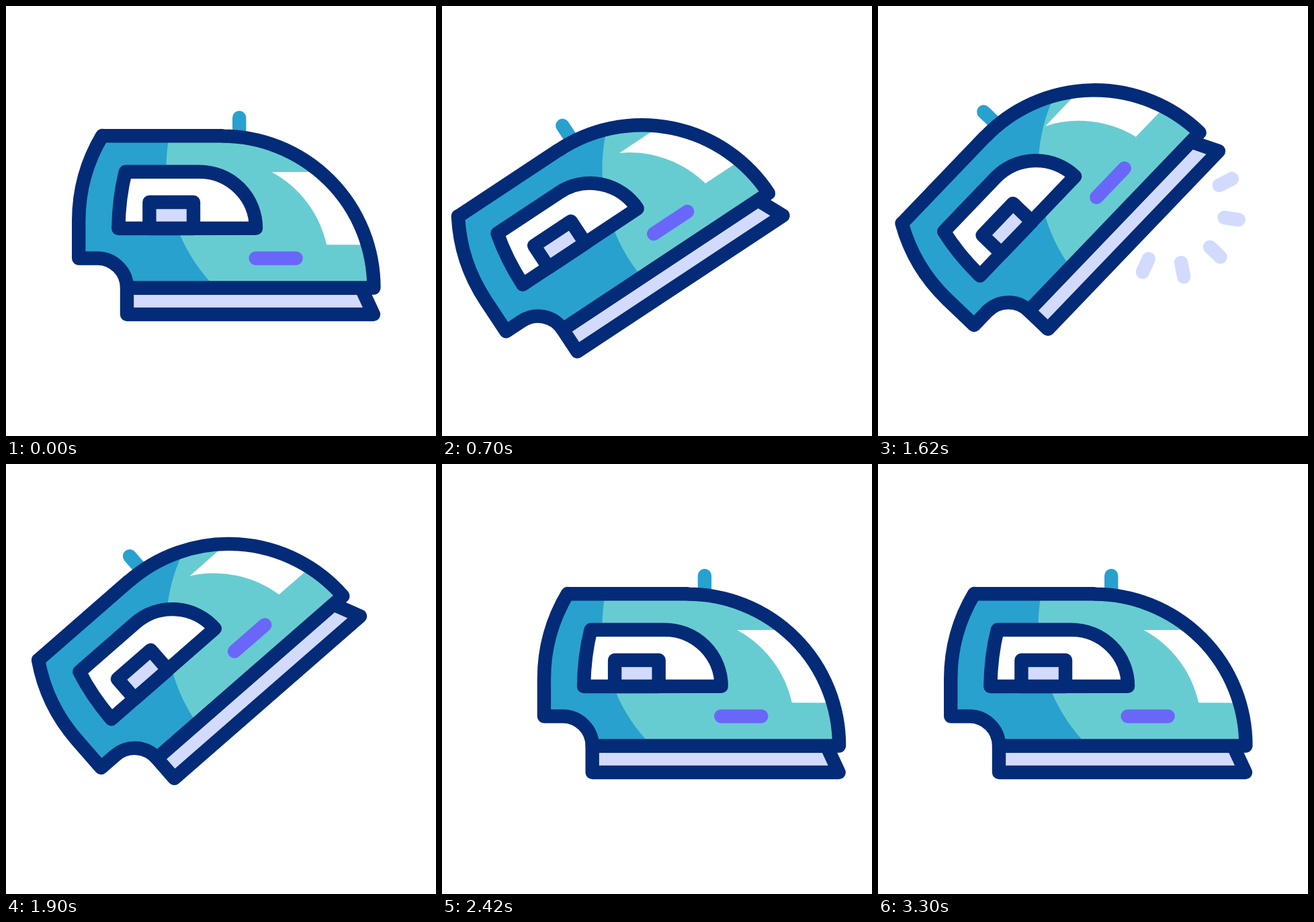
Animation, 640 px wide and 640 px high, one loop 3.4 s. Source, as an HTML page with a canvas:

```html
<!DOCTYPE html>
<html lang="en">
<head>
<meta charset="utf-8">
<title>Steam iron</title>
<style>
  html, body { margin: 0; width: 100%; height: 100%; overflow: hidden; background: #fff; }
  canvas { display: block; width: 640px; height: 640px; }
</style>
</head>
<body>
<canvas id="stage" width="640" height="640"></canvas>
<script>
const ctx = document.getElementById('stage').getContext('2d');
const LOOP = 3400;
const LINE = 20.4;
const NAVY = '#032b77', BLUE = '#28a1ce', TEAL = '#67ccd1', PALE = '#d2dbfd', VIOLET = '#6a66fa';
const PIVOT = { x: 328, y: 312.5 };

// time, angle in degrees, shift x, shift y
const POSES = [
  [100, 0, 0, 0],
  [280, -3.2, -9, 28],
  [460, -12.84, -35.3, 63.8],
  [530, -17.8, -53, 62.5],
  [645, -27.5, -80, 17.6],
  [790, -40.5, -87, -22.4],
  [1080, -42.5, -84, -28.5],
  [1620, -46.2, -78.4, -39.8],
  [1740, -47, -77.2, -42.3],
  [1930, -39.5, -58, -54],
  [2120, -23.3, -4, -61.1],
  [2265, -10.3, 31, -39],
  [2400, 0, 44.2, 0],
  [2950, 0, -75, 0],
  [3300, 0, 0, 0]
];

const clamp = x => Math.min(1, Math.max(0, x));
const span = (t, a, b) => clamp((t - a) / (b - a));
const smooth = x => x * x * (3 - 2 * x);
const easeOut = x => 1 - (1 - x) * (1 - x);

function slope(i, k) {
  const a = POSES[i], b = POSES[i + 1];
  return (b[k] - a[k]) / (b[0] - a[0]);
}

// Harmonic mean keeps the curve free of overshoot
function tangent(i, k) {
  if (i === 0 || i === POSES.length - 1) return 0;
  const a = slope(i - 1, k), b = slope(i, k);
  return a * b <= 0 ? 0 : 2 * a * b / (a + b);
}

function channel(t, k) {
  const last = POSES.length - 1;
  if (t <= POSES[0][0]) return POSES[0][k];
  if (t >= POSES[last][0]) return POSES[last][k];
  let i = 0;
  while (t >= POSES[i + 1][0]) i++;
  const a = POSES[i], b = POSES[i + 1];
  const h = b[0] - a[0], u = (t - a[0]) / h, w = smooth(u);
  return a[k] * (1 - w) + b[k] * w
    + h * u * (1 - u) * ((1 - u) * tangent(i, k) - u * tangent(i + 1, k));
}

function shape(build) {
  const p = new Path2D();
  build(p);
  return p;
}

const body = shape(p => {
  p.moveTo(143, 193.3);
  p.lineTo(322, 193.3);
  p.arc(322, 419, 225.4, -Math.PI / 2, 0);
  p.lineTo(547.2, 419.5);
  p.lineTo(180, 419.5);
  p.arc(136, 419.5, 44, 0, -Math.PI / 2, true);
  p.lineTo(108.2, 375.5);
  p.lineTo(108.2, 320);
  p.arc(356.2, 320, 248, Math.PI, Math.PI + Math.asin(127 / 248));
  p.closePath();
});

const sole = shape(p => {
  p.moveTo(180, 419.5);
  p.lineTo(180, 459);
  p.lineTo(547, 459);
  p.lineTo(528.6, 419.5);
  p.closePath();
});

const grip = shape(p => {
  p.moveTo(177.8, 246.7);
  p.lineTo(288, 246.7);
  p.arc(288, 330.7, 84, -Math.PI / 2, 0);
  p.lineTo(167.3, 331);
  p.quadraticCurveTo(168, 285, 177.8, 246.7);
  p.closePath();
});

const knob = shape(p => p.rect(213.4, 292, 65.6, 39));

const shine = shape(p => {
  p.arc(318, 390.5, 163, -1.0745, -0.2173);
  p.lineTo(560, 355.5);
  p.lineTo(560, 246.5);
  p.closePath();
});

function outline(path, fill) {
  ctx.fillStyle = fill;
  ctx.fill(path);
  ctx.strokeStyle = NAVY;
  ctx.stroke(path);
}

function bar(x1, y1, x2, y2, color) {
  ctx.strokeStyle = color;
  ctx.beginPath();
  ctx.moveTo(x1, y1);
  ctx.lineTo(x2, y2);
  ctx.stroke();
}

function steam(t) {
  const head = 56 + 53 * easeOut(span(t, 1380, 1760));
  const tail = 56 + 53 * smooth(span(t, 1460, 1800));
  if (head - tail < 0.2) return;
  for (let i = -2; i <= 2; i++) {
    const a = (90 + i * 35.3) * Math.PI / 180;
    const c = Math.cos(a), s = Math.sin(a);
    bar(435 + c * tail, 468 + s * tail, 435 + c * head, 468 + s * head, PALE);
  }
}

function paintBody() {
  ctx.save();
  ctx.clip(body);
  ctx.fillStyle = BLUE;
  ctx.fill(body);
  // The light area stays put on the stage while the iron moves
  ctx.save();
  ctx.setTransform(1, 0, 0, 1, 0, 0);
  ctx.fillStyle = TEAL;
  ctx.beginPath();
  ctx.arc(491.5, 241, 253, 0, 2 * Math.PI);
  ctx.fill();
  ctx.restore();
  ctx.fillStyle = '#fff';
  ctx.fill(shine);
  ctx.restore();
}

function draw(t) {
  ctx.setTransform(1, 0, 0, 1, 0, 0);
  ctx.fillStyle = '#fff';
  ctx.fillRect(0, 0, 640, 640);
  ctx.lineWidth = LINE;
  ctx.lineCap = ctx.lineJoin = 'round';

  ctx.translate(PIVOT.x + channel(t, 2), PIVOT.y + channel(t, 3));
  ctx.rotate(channel(t, 1) * Math.PI / 180);
  ctx.translate(-PIVOT.x, -PIVOT.y);

  const press = 12 * (smooth(span(t, 980, 1180)) - smooth(span(t, 1180, 1380)));
  steam(t);
  bar(347.2, 166.2 + press, 347.2, 195, BLUE);
  outline(sole, PALE);
  paintBody();
  ctx.strokeStyle = NAVY;
  ctx.stroke(body);
  outline(grip, '#fff');
  outline(knob, PALE);
  bar(371.6, 375.5, 431.6, 375.5, VIOLET);
}

const start = performance.now();
function tick() {
  draw((performance.now() - start) % LOOP);
  requestAnimationFrame(tick);
}
tick();
</script>
</body>
</html>
```
